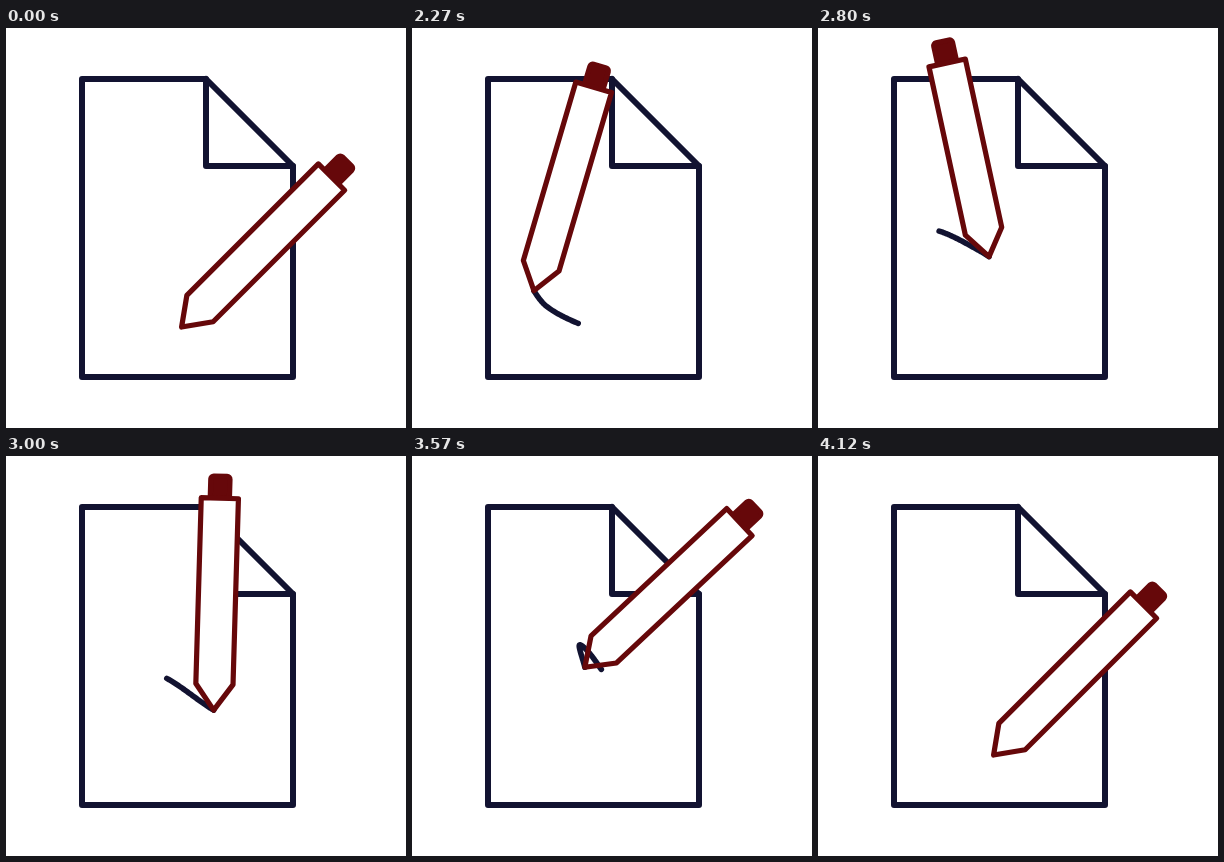
An HTML page with a canvas for the animation above (4150 ms loop, 400x400 px).

```html
<!DOCTYPE html>
<html lang="en">
<head>
<meta charset="utf-8">
<title>Writing pen</title>
<style>
html, body { margin: 0; width: 100%; height: 100%; overflow: hidden; background: #fff; }
canvas { display: block; width: 100vmin; height: 100vmin; margin: 0 auto; }
</style>
</head>
<body>
<canvas id="stage"></canvas>
<script>
const LOOP = 4150, START = 2020, END = 2100;
const NAVY = '#121331', RED = '#66080a';
const TRAIL = 56, BODY = 186;

// Turning points of the scribble: ms after START, x, y
const path = [
  [0, 175.6, 299], [200, 130, 274], [430, 102.7, 215], [500, 112, 201],
  [730, 161, 222.5], [980, 207.5, 254], [1040, 214, 253.5], [1300, 182, 203],
  [1430, 167.5, 189], [1550, 172.8, 211], [1800, 186, 265], [END, 175.6, 299]
];
// Tilt of the pen in degrees
const tilt = [[0, 45], [500, -17.4], [980, 1.6], [1300, 36.2], [1550, 46.8], [END, 45]];

// Smooth curve through the keys, at rest at both ends
function sample(keys, t, k = 1) {
  const last = keys.length - 1;
  if (t <= 0) return keys[0][k];
  if (t >= END) return keys[last][k];
  let i = 0;
  while (keys[i + 1][0] < t) i++;
  const slope = j => j === 0 || j === last ? 0 :
    (keys[j + 1][k] - keys[j - 1][k]) / (keys[j + 1][0] - keys[j - 1][0]);
  const a = keys[i], b = keys[i + 1], d = b[0] - a[0];
  const u = (t - a[0]) / d, u2 = u * u, u3 = u2 * u;
  return a[k] * (2 * u3 - 3 * u2 + 1) + b[k] * (3 * u2 - 2 * u3) +
    d * (slope(i) * (u3 - 2 * u2 + u) + slope(i + 1) * (u3 - u2));
}

const tipAt = t => [sample(path, t), sample(path, t, 2)];

const canvas = document.getElementById('stage');
const ctx = canvas.getContext('2d');

function trace(points, close) {
  ctx.beginPath();
  for (const [x, y] of points) ctx.lineTo(x, y);
  if (close) ctx.closePath();
}

function drawPage() {
  ctx.strokeStyle = NAVY;
  ctx.lineWidth = 6;
  trace([[200, 51], [76, 51], [76, 349], [287, 349], [287, 138]], false);
  ctx.stroke();
  trace([[200, 51], [200, 138], [287, 138]], true);
  ctx.stroke();
}

// The last stretch of ink behind the tip, drying up towards the end
function drawTrail(t) {
  const limit = TRAIL * Math.min(1, Math.max(0, (END - 20 - t) / 250));
  const points = [tipAt(t)];
  for (let s = t - 4, run = 0; s >= 0 && run < limit; s -= 4) {
    const p = points[points.length - 1], q = tipAt(s);
    run += Math.hypot(q[0] - p[0], q[1] - p[1]);
    points.push(q);
  }
  if (points.length < 2) return;
  ctx.strokeStyle = NAVY;
  ctx.lineWidth = 5.6;
  trace(points, false);
  ctx.stroke();
}

// Run a drawing step in the pen's own axes, tip at the origin
function inPen([x, y], angle, step) {
  ctx.save();
  ctx.translate(x, y);
  ctx.rotate(angle);
  step();
  ctx.restore();
}

function drawPen(t) {
  const tip = tipAt(t);
  const angle = sample(tilt, t) * Math.PI / 180;
  // The body shortens so that the cap stays on the stage
  const body = Math.min(BODY, (tip[1] - 11) / Math.cos(angle) - 50.5);
  const top = -26 - body;
  const outline = [[0, 0], [-18.6, -26], [-18.6, top], [18.6, top], [18.6, -26]];

  inPen(tip, angle, () => {
    ctx.strokeStyle = ctx.fillStyle = RED;
    ctx.lineWidth = 5.2;
    ctx.beginPath();
    ctx.roundRect(-9.6, top - 22, 19.2, 22, [3, 3, 0, 0]);
    ctx.fill();
    ctx.stroke();
    ctx.fillStyle = '#fff';
    trace(outline, true);
    ctx.fill();
  });
  drawTrail(t);
  inPen(tip, angle, () => {
    ctx.strokeStyle = RED;
    ctx.lineWidth = 5.2;
    trace(outline, true);
    ctx.stroke();
  });
}

function draw(time) {
  const t = Math.min(Math.max(time % LOOP - START, 0), END);
  const size = Math.round(Math.min(innerWidth, innerHeight) * devicePixelRatio) || 400;
  if (canvas.width !== size) canvas.width = canvas.height = size;
  ctx.setTransform(size / 400, 0, 0, size / 400, 0, 0);
  ctx.fillStyle = '#fff';
  ctx.fillRect(0, 0, 400, 400);
  ctx.lineCap = ctx.lineJoin = 'round';
  drawPage();
  drawPen(t);
}

const begin = performance.now();
function tick() {
  draw(performance.now() - begin);
  requestAnimationFrame(tick);
}
tick();
</script>
</body>
</html>
```
